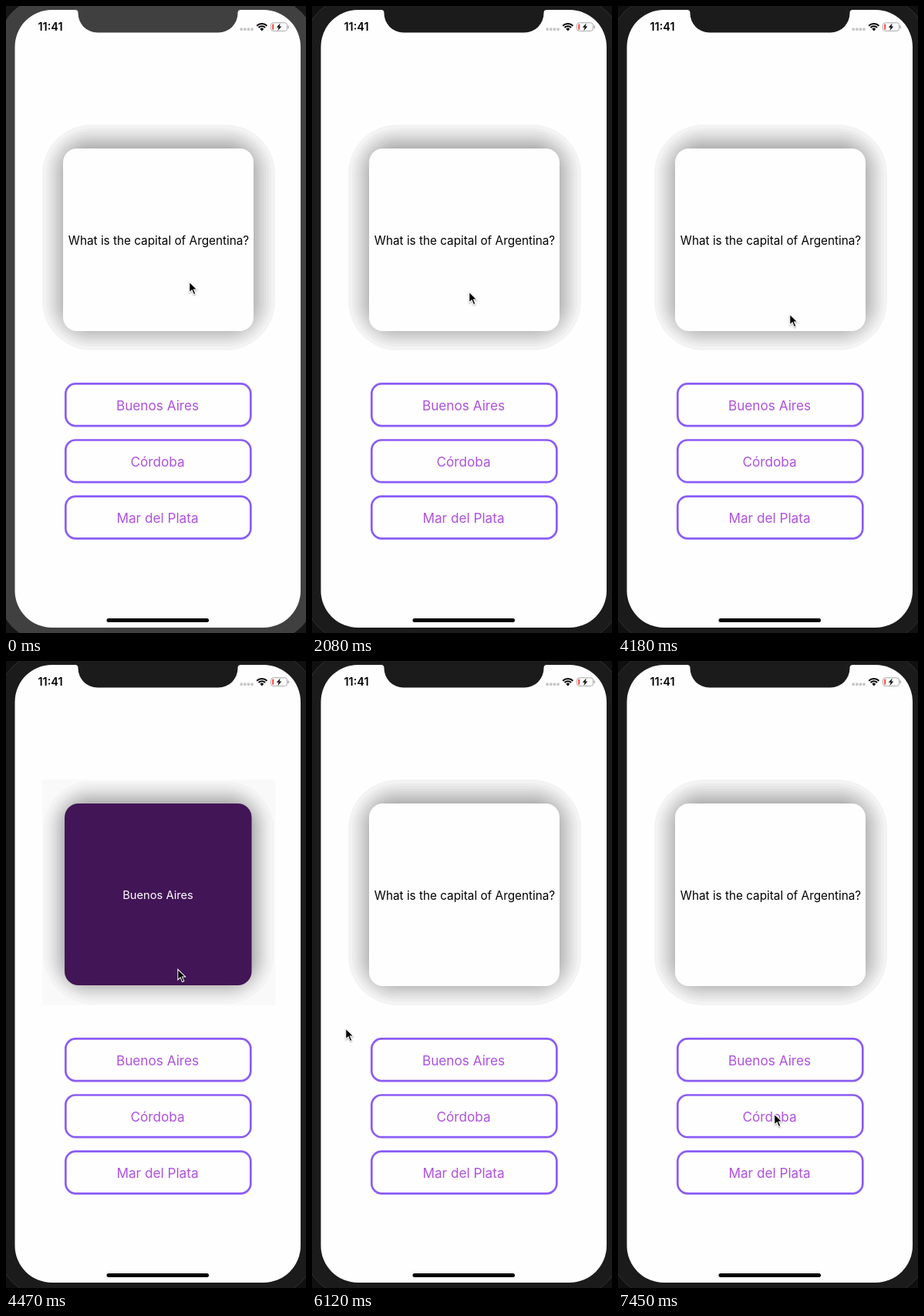
Recreate the animation shown at these times as an HTML page with a canvas. Size 389 px wide and 814 px high, loop 8000 ms.

```html
<!DOCTYPE html>
<html lang="en">
<head>
<meta charset="utf-8">
<title>Quiz card</title>
<style>
html, body { margin: 0; width: 100%; height: 100%; overflow: hidden; background: #1b1b1b; }
canvas { display: block; width: 389px; height: 814px; }
</style>
</head>
<body>
<canvas id="stage"></canvas>
<script>
const W = 389, H = 814, LOOP = 8000, BEAT = 148;
const canvas = document.getElementById('stage');
const scale = window.devicePixelRatio || 1;
canvas.width = W * scale;
canvas.height = H * scale;
const ctx = canvas.getContext('2d');

// Each stroke is a cubic curve from the last point, taken in whole beats
const home = [237, 357];
const strokes = [
  { start: 1200, steps: 7, curve: [[170, 264], [170, 330], [222, 399]] },
  { start: 5670, steps: 4, curve: [[180, 362], [43, 430], [43, 476]] },
  { start: 6265, steps: 4, curve: [[43, 505], [110, 514], [191, 509]] },
  { start: 6860, steps: 5, curve: [[191, 540], [202, 580], [204, 602]] }
];
const flips = [[2530, 4180], [4470, 5220]];
const answers = ['Buenos Aires', 'Córdoba', 'Mar del Plata'];

function bezier(u, a, b, c, d) {
  const v = 1 - u;
  return v * v * v * a + 3 * v * v * u * b + 3 * v * u * u * c + u * u * u * d;
}

function pointerAt(t) {
  let at = home;
  for (const { start, steps, curve: [b, c, d] } of strokes) {
    if (t < start) break;
    const u = Math.min(1, (Math.floor((t - start) / BEAT) + 1) / steps);
    at = [0, 1].map(i => bezier(u, at[i], b[i], c[i], d[i]));
  }
  return at.map(Math.round);
}

function rounded(x, y, w, h, r) {
  ctx.beginPath();
  ctx.roundRect(x, y, w, h, r);
}

function fillBox(x, y, w, h, r, color) {
  rounded(x, y, w, h, r);
  ctx.fillStyle = color;
  ctx.fill();
}

function strokeBox(x, y, w, h, r, color, width) {
  rounded(x, y, w, h, r);
  ctx.strokeStyle = color;
  ctx.lineWidth = width;
  ctx.stroke();
}

function polygon(points, color) {
  ctx.beginPath();
  points.forEach(([x, y]) => ctx.lineTo(x, y));
  ctx.closePath();
  ctx.fillStyle = color;
  ctx.fill();
}

function label(text, x, y, size, color, weight = 400) {
  ctx.font = `${weight} ${size}px Inter, "Liberation Sans", sans-serif`;
  ctx.textAlign = 'center';
  ctx.fillStyle = color;
  ctx.fillText(text, x, y);
}

function drawNotch(left, right, color) {
  const top = 5, bottom = 34.5, flare = 4, r = 25;
  ctx.beginPath();
  ctx.moveTo(left - flare, top - 1);
  ctx.lineTo(left - flare, top);
  ctx.arcTo(left, top, left, top + flare, flare);
  ctx.arcTo(left, bottom, left + r, bottom, r);
  ctx.arcTo(right, bottom, right, bottom - r, r);
  ctx.arcTo(right, top, right + flare, top, flare);
  ctx.lineTo(right + flare, top - 1);
  ctx.fillStyle = color;
  ctx.fill();
}

function drawPhone(lit) {
  const bezel = lit ? '#404040' : '#1b1b1b';
  ctx.fillStyle = lit ? '#161616' : '#101010';
  ctx.fillRect(0, 0, W, H);
  fillBox(-8, -9, 407, 832, 56, bezel);
  if (!lit) strokeBox(-8, -9, 407, 832, 56, '#303030', 1);
  fillBox(11.5, 5, 370.5, 802, 48, '#fefefe');
  drawNotch(93.5, 300.5, bezel);
  fillBox(130.5, 795, 132.5, 5, 2.5, '#000');
}

function drawStatus() {
  label('11:41', 57.5, 32.2, 14.4, '#000', 600);
  for (let i = 0; i < 4; i++) fillBox(303.5 + i * 4.6, 28.5, 3.4, 3.4, 0.8, '#c4c4c4');

  // Wireless fan
  const from = -Math.PI * 0.75, to = -Math.PI * 0.25;
  ctx.strokeStyle = ctx.fillStyle = '#000';
  ctx.lineWidth = 2.1;
  for (const r of [9.3, 6]) {
    ctx.beginPath();
    ctx.arc(331.8, 32.3, r, from, to);
    ctx.stroke();
  }
  ctx.beginPath();
  ctx.moveTo(331.8, 32.6);
  ctx.arc(331.8, 32.3, 3.5, from, to);
  ctx.fill();

  // Battery
  strokeBox(343.5, 21.8, 21, 10.6, 3, '#a8a8a8', 1);
  fillBox(365.6, 25.2, 1.4, 4, 0.7, '#a8a8a8');
  fillBox(345.2, 23.4, 2, 7.4, 0.8, '#f0473e');
  polygon([[355.6, 22.6], [350.8, 27.8], [353.6, 27.8], [352.4, 32], [357.3, 26.5], [354.5, 26.5]], '#000');
}

function drawShadow(flipped) {
  if (flipped) fillBox(47, 154, 302, 293, 0, '#f9f9f9');
  const bands = flipped ? 16 : 11;
  const start = flipped ? 2 : 0;
  for (let i = 0; i < bands; i++) {
    const k = i / (bands - 1);
    const d = start + (31 - start) * Math.pow(k, flipped ? 0.7 : 0.8);
    const g = Math.round(243 - 70 * k);
    fillBox(47 + d, 154 + d, 302 - 2 * d, 293 - 2 * d, 64 - d, `rgb(${g},${g},${g})`);
  }
}

function drawCard(flipped) {
  drawShadow(flipped);
  if (flipped) {
    fillBox(76, 185, 242.5, 236, 18, '#421556');
    label('Buenos Aires', 197, 308.6, 14.7, '#fff');
  } else {
    fillBox(74, 185, 247, 237, 18, '#fefefe');
    label('What is the capital of Argentina?', 198, 309.5, 15.3, '#000');
  }
}

function drawAnswers() {
  answers.forEach((text, i) => {
    const top = 490.4 + 73.1 * i;
    strokeBox(77.3, top, 240, 54.7, 13, '#8b5cf5', 2.7);
    label(text, 196.5, top + 34.1, 17.2, '#af52de');
  });
}

function drawPointer(x, y) {
  ctx.save();
  ctx.translate(x + 0.3, y);
  ctx.shadowColor = 'rgba(0,0,0,.35)';
  ctx.shadowBlur = 2 * scale;
  ctx.shadowOffsetY = scale;
  polygon([[0, 0], [0, 16.2], [3.6, 12.8], [6, 18.2], [9.2, 16.9], [6.9, 11.6], [11.6, 11.6]], '#fff');
  ctx.shadowColor = 'transparent';
  polygon([[1, 2.4], [1, 13.8], [4, 11], [6.5, 16.9], [7.9, 16.3], [5.4, 10.6], [9.2, 10.6]], '#000');
  ctx.restore();
}

function draw(t) {
  ctx.setTransform(scale, 0, 0, scale, 0, 0);
  drawPhone(t < 900);
  drawStatus();
  drawCard(flips.some(([from, to]) => t >= from && t < to));
  drawAnswers();
  drawPointer(...pointerAt(t));
}

let begin;
function tick(now) {
  if (begin === undefined) begin = now;
  draw(Math.max(0, now - begin) % LOOP);
  requestAnimationFrame(tick);
}
draw(0);
requestAnimationFrame(tick);
</script>
</body>
</html>
```
